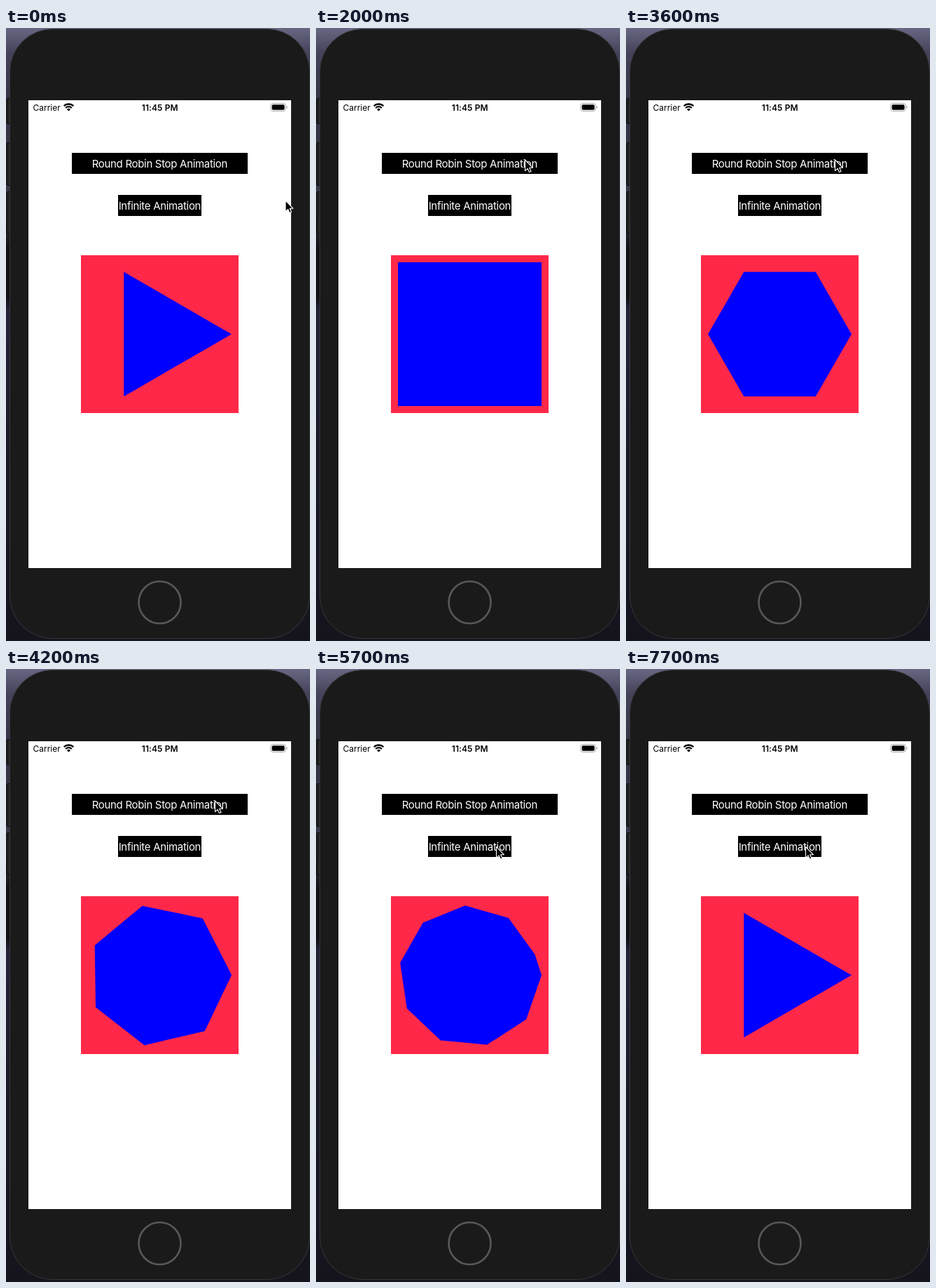
Recreate the animation shown at these times as an HTML page. Size 434x874 px, loop 8 s.

```html
<!DOCTYPE html>
<html lang="en">
<head>
<meta charset="utf-8">
<title>Shape morphing</title>
<style>
  html, body { margin: 0; width: 100%; height: 100%; overflow: hidden; background: #15141d; }
  svg { display: block; width: 434px; height: 874px; }
  text { font-family: Inter, "Liberation Sans", sans-serif; }
  .label { font-size: 15px; letter-spacing: -0.31px; fill: #fff; text-anchor: middle; }
  .status { font-size: 12px; fill: #000; }
</style>
</head>
<body>
<svg viewBox="0 0 434 874">
  <defs>
    <linearGradient id="sky" x1="0" y1="0" x2="0" y2="1">
      <stop offset="0" stop-color="#686783"/>
      <stop offset=".04" stop-color="#45435a"/>
      <stop offset=".12" stop-color="#343247"/>
      <stop offset=".3" stop-color="#3a3848"/>
      <stop offset=".36" stop-color="#121114"/>
      <stop offset=".44" stop-color="#121114"/>
      <stop offset=".46" stop-color="#25233a"/>
      <stop offset=".7" stop-color="#1b1928"/>
      <stop offset="1" stop-color="#15141d"/>
    </linearGradient>
  </defs>
  <rect width="434" height="874" fill="url(#sky)"/>

  <!-- phone body -->
  <g fill="#222" stroke="#070707">
    <rect x="1" y="100.5" width="8" height="36" rx="2"/>
    <rect x="1" y="163.5" width="8" height="61" rx="2"/>
    <rect x="1" y="233.5" width="8" height="60" rx="2"/>
    <rect x="428" y="164.5" width="8" height="60" rx="2"/>
  </g>
  <rect x="5.5" y="1.5" width="428" height="869" rx="61" fill="#1a1a1a" stroke="#37373a"/>
  <circle cx="219.5" cy="819" r="30" fill="none" stroke="#585858" stroke-width="2.6"/>
  <rect x="32" y="103" width="375" height="667" fill="#fff"/>

  <!-- status bar -->
  <text class="status" x="38.5" y="117.6">Carrier</text>
  <text class="status" x="219.7" y="117.6" font-weight="600" text-anchor="middle" letter-spacing=".1">11:45 PM</text>
  <g fill="none" stroke="#000" stroke-width="2.3">
    <path d="M82.7 111.3A9.6 9.6 0 0 1 96.3 111.3"/>
    <path d="M85.2 114A6 6 0 0 1 93.8 114"/>
  </g>
  <path d="M89.5 118.4L87 115.9A3.6 3.6 0 0 1 92 115.9Z"/>
  <rect x="377.9" y="107.6" width="21.4" height="10.8" rx="3" fill="none" stroke="#a6a6a6"/>
  <rect x="379.6" y="109.3" width="18" height="7.4" rx="1.6"/>
  <path d="M400.5 111.2Q402 111.7 402 113T400.5 114.8Z" fill="#a6a6a6"/>

  <!-- buttons -->
  <rect x="94" y="178" width="251" height="30"/>
  <text class="label" x="219.4" y="198.7">Round Robin Stop Animation</text>
  <rect x="160" y="238" width="119" height="30"/>
  <text class="label" x="219.4" y="258.7">Infinite Animation</text>

  <rect x="107" y="324" width="225" height="225" fill="#ff2849"/>
  <path id="shape" fill="#00f"/>
  <path id="cursor" d="M0 0V15.6L3.6 12.3L5.9 17.6L8.5 16.5L6.2 11.3H11Z"
        fill="#000" stroke="#fff" stroke-width="1.1" stroke-linejoin="round"/>
</svg>
<script>
const LOOP = 8000, CX = 219.5, CY = 436.5, R = 102.5, SEGMENTS = 10;

const mix = (a, b, k) => a + (b - a) * k;
const mixPoint = (a, b, k) => [mix(a[0], b[0], k), mix(a[1], b[1], k)];
const onCircle = a => [CX + R * Math.cos(a), CY + R * Math.sin(a)];

// A path is a flat list: start point, then two handles and an end point per segment.
function pad(points) {
  const end = points[points.length - 1];
  while (points.length < 1 + 3 * SEGMENTS) points.push(end);
  return points;
}

function linePath(corners) {
  const points = [corners[0]];
  corners.forEach((a, i) => {
    const b = corners[(i + 1) % corners.length];
    points.push(mixPoint(a, b, 1 / 3), mixPoint(a, b, 2 / 3), b);
  });
  return pad(points);
}

const polygon = n =>
  linePath(Array.from({ length: n }, (_, i) => onCircle(2 * Math.PI * i / n)));

function circlePath() {
  const h = 0.5523, points = [onCircle(0)];
  for (let i = 0; i < 4; i++) {
    const a = i * Math.PI / 2;
    const c = Math.cos(a) * R, s = Math.sin(a) * R;
    points.push([CX + c - s * h, CY + s + c * h],
                [CX - s + c * h, CY + c + s * h],
                [CX - s, CY + c]);
  }
  return pad(points);
}

const triangle = polygon(3);
const square = linePath([[-R, -R], [R, -R], [R, R], [-R, R]].map(([x, y]) => [CX + x, CY + y]));

// start time, duration, shape reached
const morphs = [
  [630, 1070, square],
  [2350, 500, triangle],
  [3000, 500, polygon(6)],
  [3660, 500, polygon(7)],
  [4180, 500, polygon(8)],
  [4800, 500, polygon(9)],
  [5455, 500, polygon(10)],
  [6022, 500, circlePath()],
  [6665, 540, triangle]
];

// time, x, y of the pointer tip
const pointer = [
  [40, 399, 246], [500, 298.5, 188], [4650, 298.5, 188],
  [5250, 257.5, 253.5], [5950, 257.5, 253.5], [6000, 256.5, 253.5]
];

function shapeAt(t) {
  let from = triangle;
  for (const [start, length, to] of morphs) {
    if (t < start) break;
    const k = (t - start) / length;
    if (k < 1) return from.map((p, i) => mixPoint(p, to[i], k));
    from = to;
  }
  return from;
}

function pointerAt(t) {
  const next = pointer.findIndex(p => p[0] > t);
  if (next === 0) return pointer[0].slice(1);
  if (next < 0) return pointer[pointer.length - 1].slice(1);
  const a = pointer[next - 1], b = pointer[next];
  return mixPoint(a.slice(1), b.slice(1), (t - a[0]) / (b[0] - a[0]));
}

const shape = document.getElementById("shape");
const cursor = document.getElementById("cursor");
const begin = performance.now();

function draw(now) {
  const t = Math.max(0, now - begin) % LOOP;
  const [start, ...rest] = shapeAt(t).map(p => p.map(v => v.toFixed(2)).join(" "));
  shape.setAttribute("d", `M${start}C${rest.join(" ")}Z`);
  cursor.setAttribute("transform", `translate(${pointerAt(t).join(" ")})`);
  requestAnimationFrame(draw);
}
draw(begin);
</script>
</body>
</html>
```
